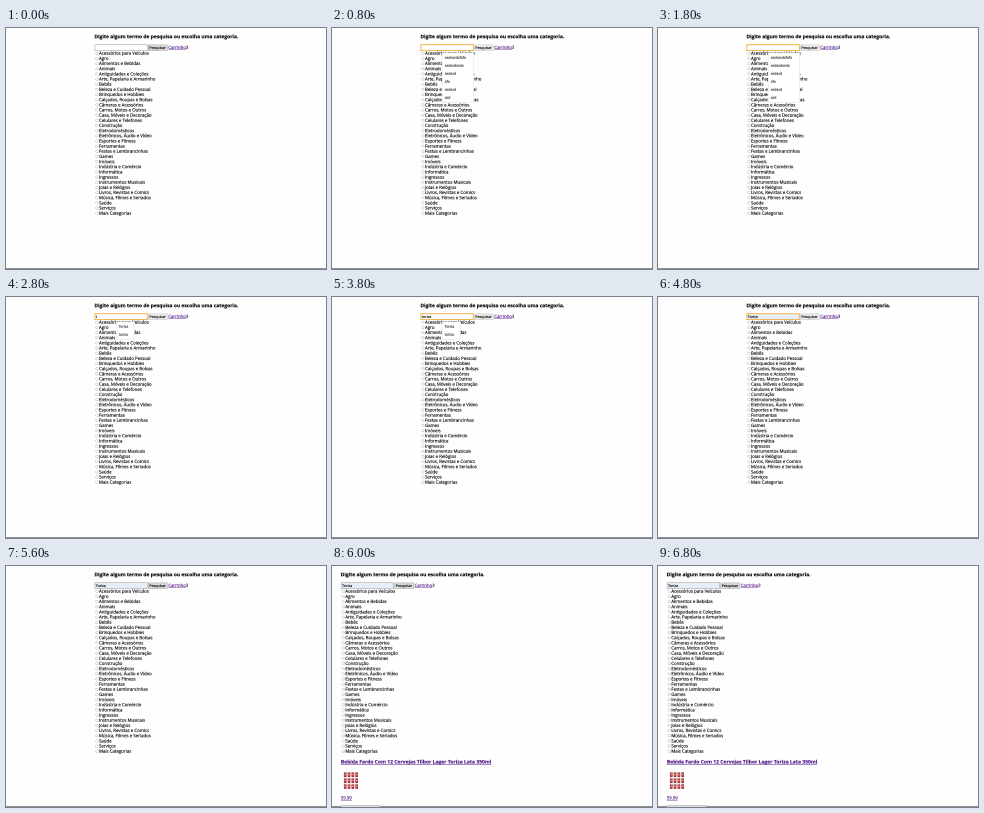
An HTML page with a canvas that plays this animation: 320x241 px, repeating every 8 s.

```html
<!DOCTYPE html>
<html lang="pt-BR">
<head>
<meta charset="utf-8">
<title>Pesquisa</title>
<style>
html, body { margin: 0; width: 100%; height: 100%; overflow: hidden; background: #fefefe; }
canvas { display: block; width: 320px; height: 241px; }
</style>
</head>
<body>
<canvas id="stage"></canvas>
<script>
const LOOP = 8000;
const W = 320, H = 241;
const ZOOM = 4;
const dpr = window.devicePixelRatio || 1;

const stage = document.getElementById('stage');
stage.width = W * dpr;
stage.height = H * dpr;
const view = stage.getContext('2d');

// The page is painted enlarged, then scaled down like a screen recording.
const page = document.createElement('canvas');
page.width = W * ZOOM;
page.height = H * ZOOM;
const ctx = page.getContext('2d');

const INK = '#0c0c0c', LINK = '#551a8b';
const BRAND = 'Toriza';
const TYPED = BRAND.toLowerCase();
const CATEGORIES = [
  'Acessórios para Veículos', 'Agro', 'Alimentos e Bebidas', 'Animais',
  'Antiguidades e Coleções', 'Arte, Papelaria e Armarinho', 'Bebês',
  'Beleza e Cuidado Pessoal', 'Brinquedos e Hobbies', 'Calçados, Roupas e Bolsas',
  'Câmeras e Acessórios', 'Carros, Motos e Outros', 'Casa, Móveis e Decoração',
  'Celulares e Telefones', 'Construção', 'Eletrodomésticos',
  'Eletrônicos, Áudio e Vídeo', 'Esportes e Fitness', 'Ferramentas',
  'Festas e Lembrancinhas', 'Games', 'Imóveis', 'Indústria e Comércio',
  'Informática', 'Ingressos', 'Instrumentos Musicais', 'Joias e Relógios',
  'Livros, Revistas e Comics', 'Música, Filmes e Seriados', 'Saúde',
  'Serviços', 'Mais Categorias'
];
const HISTORY = ['asokasdafafa', 'asdasdasda', 'asdasd', 'afa', 'asdasd', 'asd'];
const MATCHES = [BRAND, TYPED];

// Lay text out at ten times its size so small glyph advances stay exact.
function text(str, x, y, size, { color = INK, bold = false, underline = false } = {}) {
  ctx.save();
  ctx.translate(x, y);
  ctx.scale(0.1, 0.1);
  ctx.font = `${bold ? 'bold ' : ''}${size * 10}px "Open Sans", "Noto Sans", sans-serif`;
  ctx.fillStyle = ctx.strokeStyle = color;
  ctx.lineWidth = 1.6;
  ctx.lineJoin = 'round';
  ctx.fillText(str, 0, 0);
  ctx.strokeText(str, 0, 0);
  if (underline) ctx.fillRect(0, size * 1.1, ctx.measureText(str).width, bold ? 5 : 4);
  ctx.restore();
}

function box(x, y, w, h, fill, stroke, line = 0.6) {
  ctx.fillStyle = fill;
  ctx.fillRect(x, y, w, h);
  if (!stroke) return;
  ctx.strokeStyle = stroke;
  ctx.lineWidth = line;
  ctx.strokeRect(x, y, w, h);
}

function drawSearch(s) {
  const fill = s.filled ? '#e6eefa' : '#fff';
  box(88.9, 16.7, 52.4, 5.9, fill, s.focus ? '#efae3c' : '#a8a8a8', s.focus ? 0.9 : 0.6);
  text(s.value, 89.8, 20.9, 3.6);
  box(142.3, 16.9, 19, 5.6, s.hover ? '#dcdcdc' : '#ececec', s.hover ? '#a0a0a0' : '#c4c4c4', 0.5);
  text('Pesquisar', 143.4, 20.9, 3.6);
  text('Carrinho', 162.3, 21.1, 4.3, { color: LINK, underline: true });
  text('3', 179.8, 21.1, 4.3, { color: '#2b2340' });
}

function drawList() {
  CATEGORIES.forEach((name, i) => {
    const y = 26.8 + i * 5.16;
    ctx.beginPath();
    ctx.arc(90.9, y - 1.5, 1.25, 0, Math.PI * 2);
    ctx.fillStyle = '#fff';
    ctx.fill();
    ctx.strokeStyle = '#aaa';
    ctx.lineWidth = 0.4;
    ctx.stroke();
    text(name, 93, y, 4.37);
  });
}

function drawPopup(items, width, active) {
  box(110.2, 24.9, width, items.length * 8 + 1.6, '#fff', '#e0e0e0', 0.5);
  items.forEach((item, i) => {
    if (i === active) box(110.4, 25.7 + i * 8, width - 0.4, 8, '#e8e8e8');
    text(item, 112.7, 30.8 + i * 8, 3.45, { color: '#3a3244' });
  });
}

function drawProduct() {
  text(`Bebida Fardo Com 12 Cervejas Tilbor Lager ${BRAND} Lata 350ml`, 8.8, 197.6, 5,
    { color: LINK, bold: true, underline: true });
  for (let row = 0; row < 3; row++) {
    for (let col = 0; col < 4; col++) {
      const x = 11.9 + col * 3.8, y = 206 + row * 5.9;
      box(x, y, 2.7, 5, '#b3383c');
      box(x + 0.3, y, 2.1, 0.9, '#b4afb0');
      box(x + 0.7, y + 1.9, 1.3, 1.3, '#d9a9a4');
      box(x + 0.3, y + 4.5, 2.1, 0.5, '#6f3538');
    }
  }
  text('59.99', 8.8, 233.6, 4.3, { color: LINK, underline: true });
  box(9, 239.4, 39.5, 3, '#dedede', '#aaa', 0.5);
}

function typed(t) {
  if (t >= 4400) return BRAND;
  if (t >= 3600) return TYPED;
  if (t >= 3200) return TYPED.slice(0, 3);
  if (t >= 3000) return TYPED.slice(0, 2);
  return t >= 2800 ? TYPED[0] : '';
}

function draw(t) {
  const results = t >= 6000;
  ctx.setTransform(ZOOM, 0, 0, ZOOM, 0, 0);
  box(0, 0, W, H, '#fefefe');
  box(0, 240, W, 1, '#909090');

  ctx.save();
  if (results) ctx.translate(-79.7, 0);
  text('Digite algum termo de pesquisa ou escolha uma categoria.', 88.4, 10.2, 4.94, { bold: true });
  drawSearch({
    value: typed(t),
    filled: t >= 4400,
    focus: t >= 800 && t < 5400,
    hover: t < 800 || t >= 5400
  });
  drawList();
  if (t >= 800 && t < 2800) drawPopup(HISTORY, 31.5, -1);
  else if (t >= 2800 && t < 4800) drawPopup(MATCHES, 17.8, t >= 4400 ? 0 : -1);
  ctx.restore();

  if (results) drawProduct();

  view.imageSmoothingQuality = 'high';
  view.drawImage(page, 0, 0, stage.width, stage.height);
}

function tick() {
  draw(performance.now() % LOOP);
  requestAnimationFrame(tick);
}
tick();
</script>
</body>
</html>
```
